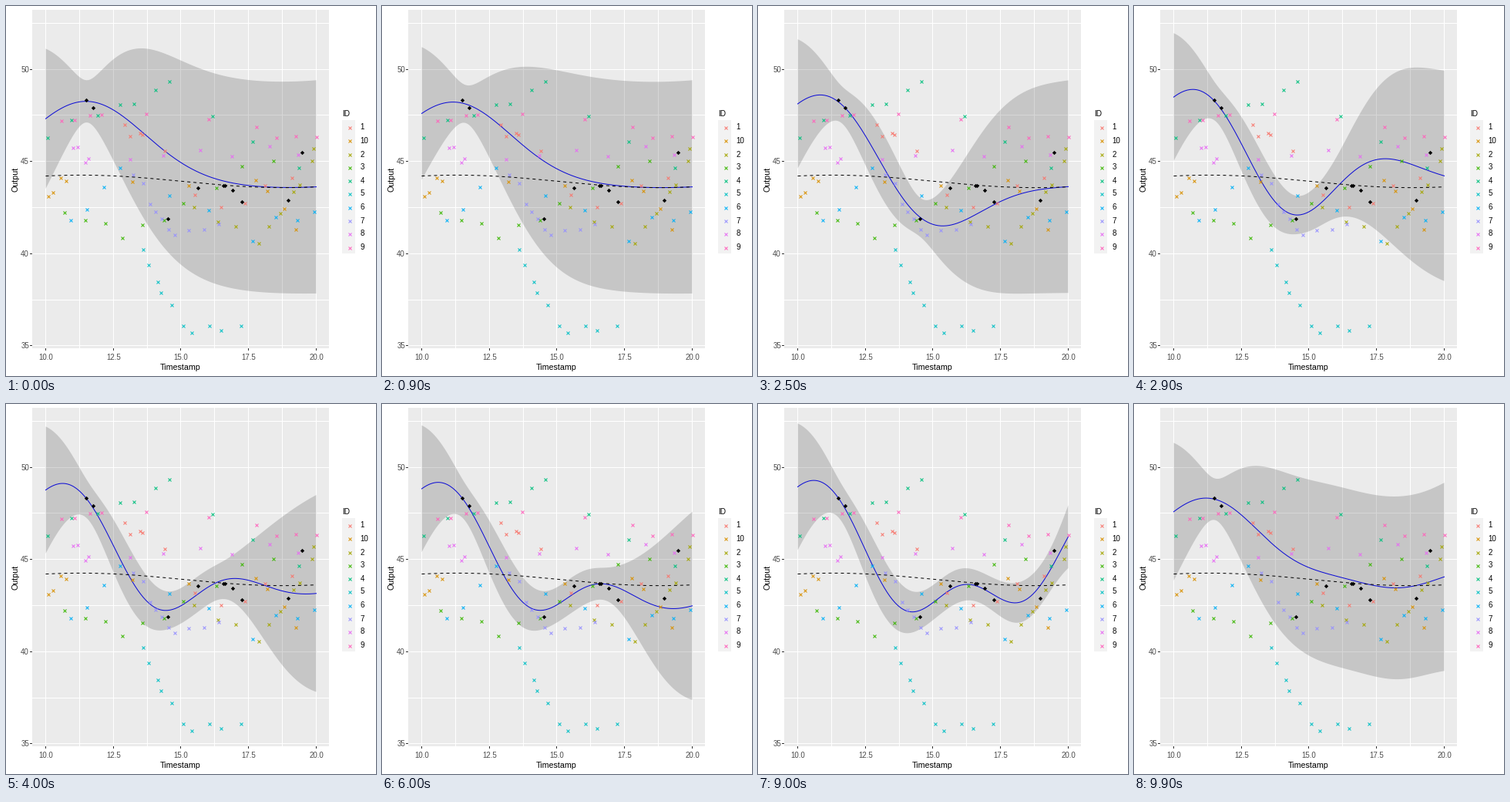
These frames come from a looping animation (480 by 480 pixels, 10 s). A matplotlib script:

```python
import numpy as np
import matplotlib.pyplot as plt
from matplotlib.animation import FuncAnimation
from matplotlib.patches import Polygon, Rectangle

SIZE, DPI = 480, 80
PX = 72 / DPI  # points per pixel
FRAMES, INTERVAL = 100, 100

plt.rcParams["font.family"] = "Liberation Sans"


def px(t):
    return 51 + 35.1 * (np.asarray(t) - 10)


def py(v):
    return 82 + 23.93 * (50 - np.asarray(v))


# --- Gaussian process with a smooth prior mean ---------------------------
LENGTH, SIGNAL, NOISE = 2.11, 8.35, 0.148
OBS_T = np.array([11.5, 11.76, 14.52, 15.63, 16.57, 16.63, 16.92, 17.25,
                  18.96, 19.48])
OBS_Y = np.array([48.35, 47.92, 41.9, 43.58, 43.73, 43.73, 43.45, 42.85,
                  42.91, 45.5])
GRID = np.linspace(10, 20, 201)


def prior_mean(t):
    return 43.94 + 0.34 * np.cos(np.pi * (t - 11.3) / 7.5)


def kernel(a, b):
    return SIGNAL * np.exp(-(a[:, None] - b[None, :]) ** 2 / (2 * LENGTH**2))


def predict(count):
    """Rows of mean, lower and upper bound after `count` observations."""
    t, y = OBS_T[:count], OBS_Y[:count]
    cov = kernel(t, t) + NOISE * np.eye(count)
    cross = kernel(GRID, t)
    weights = np.linalg.solve(cov, cross.T)
    mean = prior_mean(GRID) + weights.T @ (y - prior_mean(t))
    edge = 0.2 * ((GRID - 15) / 5) ** 4
    var = SIGNAL + NOISE + edge - np.sum(cross.T * weights, axis=0)
    half = 1.96 * np.sqrt(var)
    return np.array([mean, mean - half, mean + half])


STATES = [predict(n) for n in range(1, len(OBS_T) + 1)]

# --- stage: one unit is one pixel, y points down -------------------------
fig = plt.figure(figsize=(SIZE / DPI, SIZE / DPI), dpi=DPI, facecolor="white")
ax = fig.add_axes([0, 0, 1, 1])
ax.set_xlim(-0.5, SIZE - 0.5)
ax.set_ylim(SIZE - 0.5, -0.5)
ax.axis("off")


def box(x, y, w, h, color, z=0):
    ax.add_patch(Rectangle((x - 0.5, y - 0.5), w, h, fc=color, lw=0,
                           antialiased=False, zorder=z))


def label(x, y, text, size, color="black", **kw):
    ax.text(x, y, text, fontsize=size * PX, color=color, va="baseline", **kw)


def crosses(color, x, y):
    ax.plot(x, y, ls="", marker="x", ms=4 * PX, mew=PX, color=color, zorder=5)


# panel, grid and axes
LEFT, TOP, RIGHT, BOTTOM = 34, 5, 419, 444
box(LEFT, TOP, RIGHT - LEFT, BOTTOM - TOP, "#EBEBEB")
for t in np.arange(10, 20.1, 1.25):
    box(np.round(px(t)), TOP, 1, BOTTOM - TOP, "white", 1)
for v in np.arange(35, 52.6, 2.5):
    box(LEFT, np.floor(py(v)), RIGHT - LEFT, 1, "white", 1)
for t in np.arange(10, 20.1, 2.5):
    x = np.round(px(t))
    box(x, BOTTOM, 1, 3, "#333333", 1)
    label(x, 458.5, f"{t:.1f}", 9.8, "#4D4D4D", ha="center")
for v in range(35, 51, 5):
    y = np.floor(py(v))
    box(31, y, 3, 1, "#333333", 1)
    label(29.5, y + 3.5, str(v), 9.8, "#4D4D4D", ha="right")
label(226, 472, "Timestamp", 10.6, ha="center")
label(15.5, 224, "Output", 10.6, ha="center", rotation=90,
      rotation_mode="anchor")

# Each individual: colour and four key points of its path, in pixels.
PEOPLE = {
    "1": ("#F8766D", [(153, 153), (176, 166), (278, 260), (370, 222)]),
    "10": ("#D89000", [(54, 246), (77, 226), (323, 225), (375, 289)]),
    "2": ("#A3A500", [(243, 260), (327, 307), (372, 240), (398, 184)]),
    "3": ("#39B600", [(75, 267), (150, 300), (229, 255), (346, 200)]),
    "4": ("#00BF7D", [(53, 170), (147, 127), (211, 97), (379, 209)]),
    "5": ("#00BFC4", [(177, 315), (200, 371), (240, 423), (304, 414)]),
    "6": ("#00B0F6", [(83, 277), (147, 209), (319, 304), (399, 266)]),
    "7": ("#9590FF", [(164, 218), (193, 266), (218, 296), (275, 282)]),
    "8": ("#E76BF3", [(86, 183), (106, 197), (251, 186), (378, 192)]),
    "9": ("#FF62BC", [(71, 148), (123, 140), (324, 156), (402, 169)]),
}
rng = np.random.default_rng(4)


def samples(keys):
    """Ten points: the keys, and two scattered ones between each pair."""
    step = np.arange(10)
    x, y = (np.interp(step / 3, range(4), axis) for axis in zip(*keys))
    between = step % 3 > 0
    return (np.round(x + between * rng.normal(0, 3, 10)),
            np.round(y + between * rng.normal(0, 7, 10)))


label(436, 142.5, "ID", 10)
box(436, 148, 17, 173, "#F2F2F2")
for i, (name, (color, keys)) in enumerate(PEOPLE.items()):
    y = np.round(157 + 17.28 * i)
    crosses(color, [445], [y])
    label(459, y + 3, name, 9.8)
    crosses(color, *samples(keys))

# prior mean and observations
ax.plot(px(GRID), py(prior_mean(GRID)), color="black", lw=PX,
        dashes=(4, 4), dash_capstyle="butt", zorder=6)
ax.plot(px(OBS_T), py(OBS_Y), ls="", marker="D", ms=3.8 * PX, mew=0,
        color="black", zorder=7)

# moving parts: the band lies over the curve and tints it
curve, = ax.plot([], [], color="blue", lw=PX, zorder=3)
band = Polygon(np.zeros((3, 2)), closed=True, fc="#333333", alpha=0.2, lw=0,
               zorder=4)
ax.add_patch(band)


def progress(frame):
    """Current state and the share of the way to the next one."""
    state, step = divmod(frame, 10)
    hold = 3 if state == 0 else 4
    return state, max(0, step - hold) / (10 - hold)


def draw(frame):
    state, share = progress(frame)
    after = STATES[(state + 1) % len(STATES)]
    mean, low, high = (1 - share) * STATES[state] + share * after
    x = px(GRID)
    curve.set_data(x, py(mean))
    band.set_xy(np.column_stack([np.append(x, x[::-1]),
                                 np.append(py(high), py(low)[::-1])]))
    return curve, band


anim = FuncAnimation(fig, draw, frames=FRAMES, interval=INTERVAL, repeat=True,
                     repeat_delay=0)
plt.show()
```
